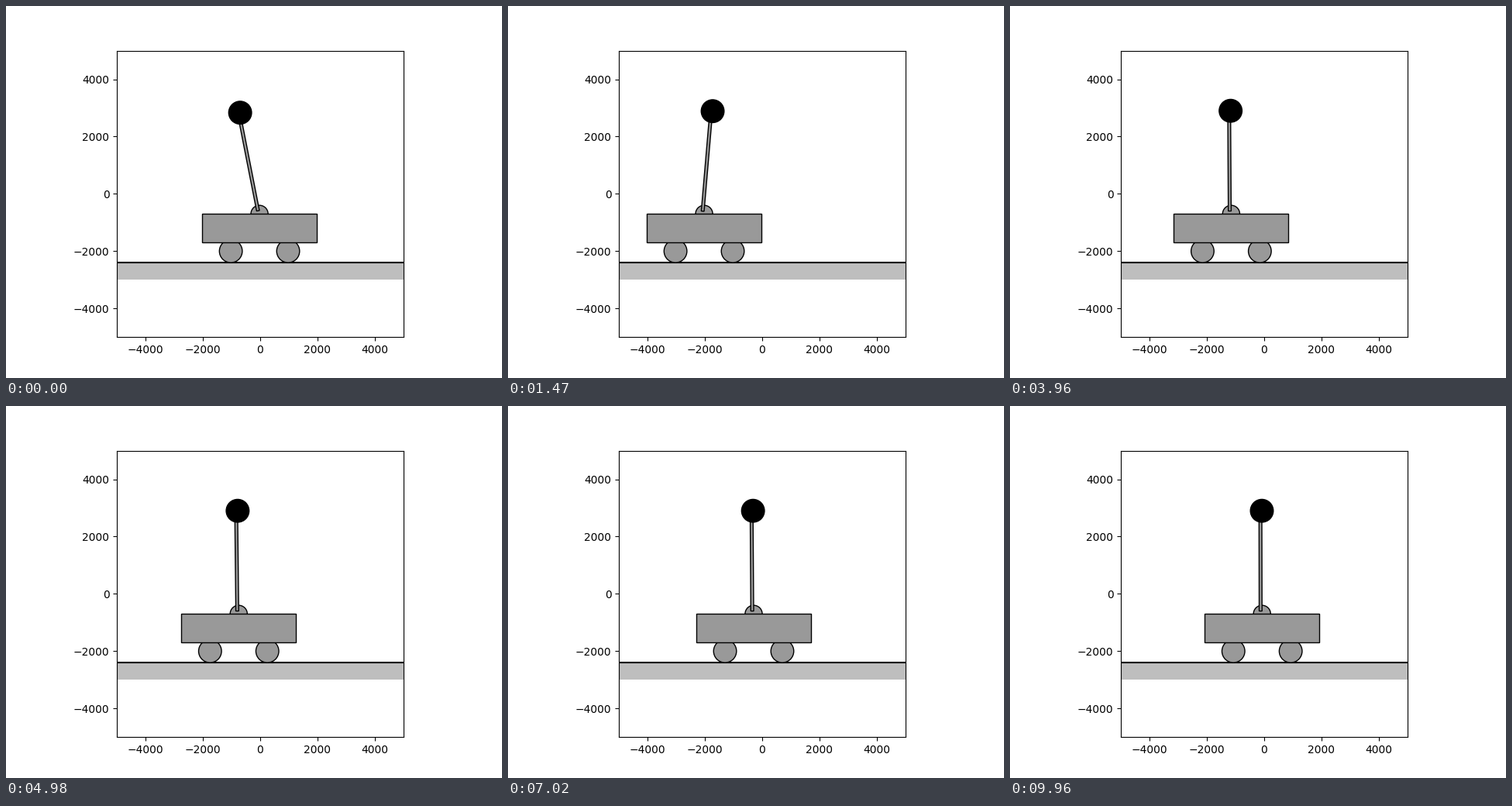
A matplotlib script for the animation above (9990 ms loop, 640 by 480 pixels).

```python
import numpy as np
import matplotlib.pyplot as plt
from matplotlib.animation import FuncAnimation
from matplotlib.patches import Circle, Rectangle

FRAMES, INTERVAL = 333, 30
ROD = 3500
GRAVITY = 9800
GREY = "0.6"

# Closed-loop cart response: decaying modes (amplitude in mm, rate in 1/s)
AMPS = np.array([-8142.0, 13211.0, -5094.0])
RATES = np.array([0.47, 1.2, 2.165])
FREE_RATE = np.sqrt(GRAVITY / ROD)
HEAD_START = -700

# Pendulum head driven by the cart: y'' = (g / L) * (y - x)
HEAD_AMPS = AMPS / (1 - (RATES / FREE_RATE) ** 2)
FREE_AMP = HEAD_START - HEAD_AMPS.sum()


def state(t):
    """Cart position and lean angle (positive to the right)."""
    decay = np.exp(-RATES * t)
    x = AMPS @ decay
    head = HEAD_AMPS @ decay + FREE_AMP * np.exp(-FREE_RATE * t)
    return x, np.arcsin((head - x) / ROD)


fig = plt.figure(figsize=(6.4, 4.8), dpi=100)
ax = fig.add_subplot(111)
ax.set_aspect("equal")
ax.set_xlim(-5000, 5000)
ax.set_ylim(-5000, 5000)

ax.add_patch(Rectangle((-6000, -3000), 12000, 600, fc="0.745", lw=0, zorder=1))
ax.plot([-6000, 6000], [-2400, -2400], color="black", lw=1.5, zorder=2)


def add(patch, z, color=GREY):
    patch.set(facecolor=color, edgecolor="black", linewidth=1, zorder=z)
    return ax.add_patch(patch)


wheels = [add(Circle((0, 0), 400), 2.1) for _ in range(2)]
joint = add(Circle((0, 0), 300), 2.1)
body = add(Rectangle((0, 0), 4000, 1000), 2.2)
rod = add(Rectangle((0, 0), 100, ROD), 2.3)
bob = add(Circle((0, 0), 400), 2.4, "black")


def update(frame):
    x, lean = state(frame * INTERVAL / 1000)
    for wheel, offset in zip(wheels, (-1000, 1000)):
        wheel.center = (x + offset, -2000)
    joint.center = (x, -700)
    body.set_xy((x - 2000, -1700))
    rod.set_xy((x - 100, -600))
    rod.set_angle(-np.degrees(lean))
    bob.center = (x + ROD * np.sin(lean), -600 + ROD * np.cos(lean))
    return [*wheels, joint, body, rod, bob]


anim = FuncAnimation(fig, update, frames=FRAMES, interval=INTERVAL,
                     init_func=lambda: update(0), repeat=True, repeat_delay=0)
plt.show()
```
